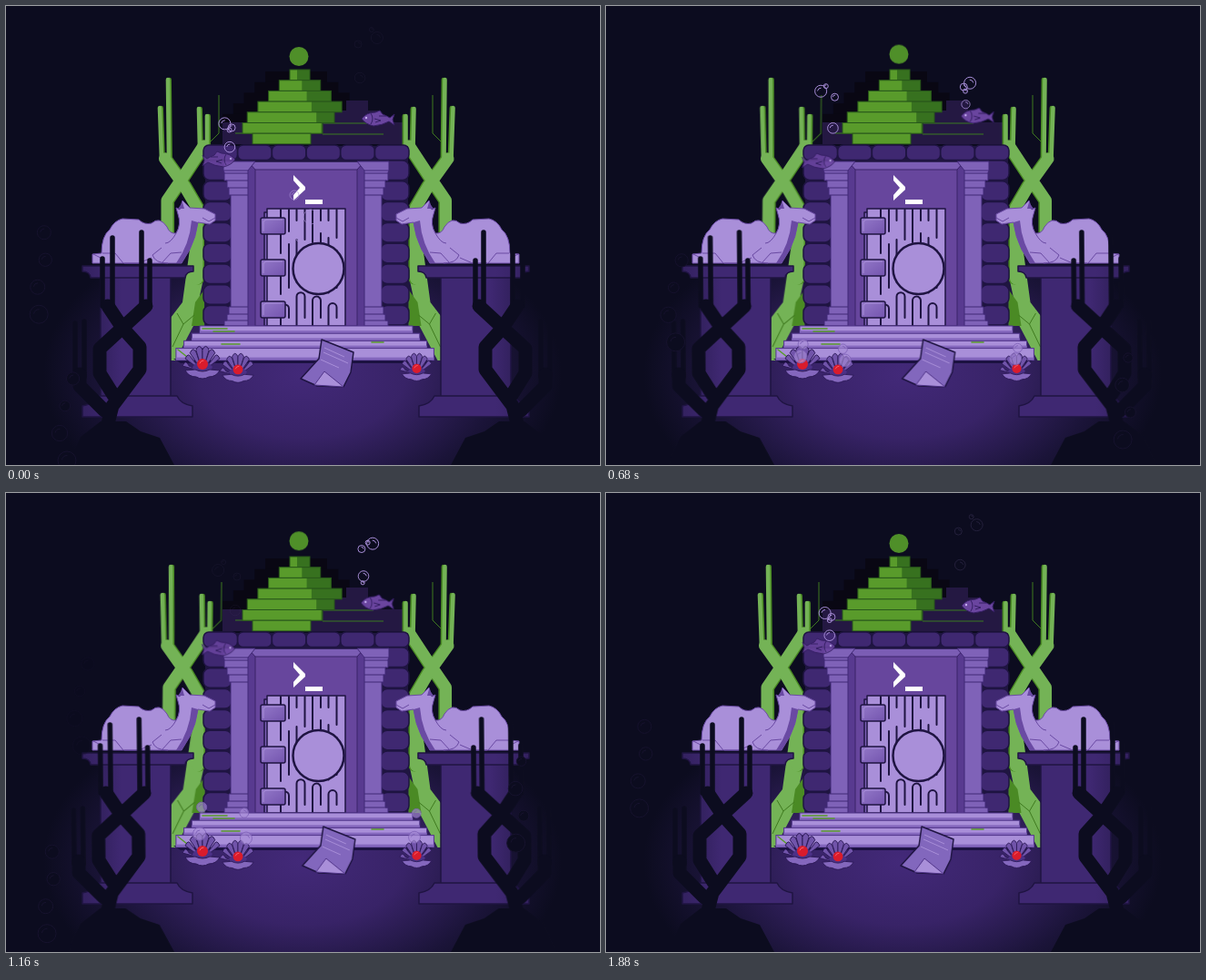
These frames come from a looping animation (653x505 px, 1.92 s). An HTML page:

```html
<!DOCTYPE html>
<html lang="en">
<head>
<meta charset="utf-8">
<title>Sunken temple</title>
<style>
html, body { margin: 0; width: 100%; height: 100%; overflow: hidden; background: #0c0c1f; }
svg { display: block; width: 653px; height: 505px; }
.lean, .bob { animation: 960ms cubic-bezier(.37, 0, .63, 1) infinite alternate; }
.lean { animation-name: lean; }
.bob { animation-name: bob; }
@keyframes lean { to { transform: skewX(var(--a)); } }
@keyframes bob { to { transform: translate(var(--x, 0px), var(--y, 0px)); } }
.ink { stroke: #1f1442; stroke-width: 1.5; stroke-linejoin: round; }
.thin { fill: none; stroke-width: 1; }
.line { fill: none; stroke-linecap: round; stroke-linejoin: round; }
</style>
</head>
<body>
<svg id="stage" viewBox="0 0 653 505">
<defs>
  <radialGradient id="glow" gradientUnits="userSpaceOnUse" cx="0" cy="0" r="1" gradientTransform="translate(326 405) scale(285 175)">
    <stop offset="0" stop-color="#432979"/><stop offset=".4" stop-color="#382367"/>
    <stop offset=".75" stop-color="#1b1439"/><stop offset="1" stop-color="#0c0c1f"/>
  </radialGradient>
  <linearGradient id="plinth"><stop offset="0" stop-color="#33215f"/><stop offset=".3" stop-color="#3f2872"/></linearGradient>
  <linearGradient id="hinge" x2="1" y2="1"><stop offset="0" stop-color="#9479c9"/><stop offset="1" stop-color="#7354ae"/></linearGradient>

  <g id="stems" class="line">
    <path stroke-width="4.6" d="M169 112L171 168M178 81L179 166M212 113L213 156M221 121V152"/>
    <path stroke-width="13" d="M174.5 168L196 198L210 222V300M217 154L196 186L177 214V262"/>
  </g>
  <g id="weed">
    <path fill="#74b356" d="M203 260H217V300L206 352L186 390H180L181 343L194 326Z"/>
    <path fill="#4a8a24" d="M208 326L218 312V352H204Z"/>
    <use href="#stems" x="1.6" stroke="#4a8a24"/>
    <use href="#stems" stroke="#74b356"/>
    <path class="thin" stroke="#3f7a1f" d="M183 375L195 350L188 338M195 350L207 340"/>
  </g>

  <g id="pillar">
    <g fill="#3f2871" class="ink" id="blocks"></g>
    <path fill="#7f62b8" stroke="#412876" d="M239 171H274L266 181V352H240V346H243V339H245V331H247V208H245V200H243V192H240V183L239 181Z"/>
    <path class="thin" stroke="#412876" d="M239 181H266M240 184H266M242 192H266M244 200H266M247 208H266M247 331H266M243 339H266M240 346H266"/>
  </g>

  <g id="statue">
    <g fill="url(#plinth)" class="ink">
      <path d="M104 297H181V430H104Z"/>
      <path d="M84 286H206V292Q198 292 197 299H93Q92 292 84 292Z"/>
      <path d="M99 429H188Q192 438 205 440V452H84V440Q97 438 99 429Z"/>
    </g>
    <path fill="#a98fd9" stroke="#6a4aa3" d="M95 283V273L105 272Q105 253 114 246Q119 236 128 234L146 235Q152 241 160 239Q169 231 177 243Q180 251 187 250Q193 240 189 229L187 222L191 224L194 214L202 222L218 223L230 229V236L224 240L211 238Q209 254 202 268L193 283Z"/>
    <path fill="#6a4aa3" d="M211 238Q209 254 202 268L193 283H187Q202 262 204 236ZM189 223L194 216L196 223Z"/>
    <path class="thin" stroke="#6a4aa3" d="M96 273L104 277V283M106 272H120L129 283M178 283Q164 283 161 274L171 266M130 283H146L160 277M171 283L181 272L193 271M187 250Q181 261 175 261M216 233L223 237L230 233"/>
  </g>

  <g id="shade" stroke="#0c0c1f">
    <g class="line">
      <path stroke-width="5.5" d="M106 278V330M117 255V332M149 249V332M158 280V330M76 349V408M86 347V408"/>
      <path stroke-width="15" d="M112 330L128 354L147 375V400L117 440L108 475M154 330L128 354L103 377V404L118 428M81 405V418L108 445"/>
    </g>
    <path fill="#0c0c1f" stroke="none" d="M68 505L82 474L104 457H132L148 468L169 475L185 505Z"/>
  </g>

  <g id="fish">
    <path fill="#6a459f" stroke="#351f63" d="M391 124Q396 117 406 117L411 115L414 119Q419 121 422 123L427 119L425 125L427 131L421 127Q414 131 404 132Q395 130 391 124Z"/>
    <path class="thin" stroke="#351f63" d="M401 118Q405 124 401 130M405 124L412 126L406 128M410 121H418"/>
    <circle cx="396" cy="123" r="1.2" fill="#c4aef0"/>
  </g>

  <g id="clam">
    <g id="fan" fill="#7154aa" stroke="#2d1a58"></g>
    <path fill="#4c3187" d="M-11 4Q0 -10 11 4L8 10H-8Z"/>
    <path fill="#8467bd" stroke="#2d1a58" d="M-19 8L-8 7Q0 11 8 7L19 8Q15 15 7 15Q0 19 -7 15Q-15 15 -19 8Z"/>
    <circle cy="1" r="6" fill="#d91c2c"/><path class="line" stroke="#ff6268" d="M-3 0Q-2 -3 1 -3"/>
  </g>
</defs>

<rect width="653" height="505" fill="#0c0c1f"/>
<rect y="220" width="653" height="285" fill="url(#glow)"/>

<g id="ruin" fill="#090713"></g>
<path fill="#241842" d="M238 128H348V115H374V104H398V115H412V128H437V152H238Z"/>
<path class="thin" stroke="#3b7a20" d="M252 140H275M348 141H415M349 129H404"/>
<g id="dome"></g>
<circle class="bob" style="--y:-3px" cx="322" cy="55.5" r="10.5" fill="#4f8f29"/>

<g class="lean" style="--a:-.65deg;transform-origin:200px 390px">
  <path class="thin" stroke="#3f7a1f" d="M234 98V140L222 152"/>
  <use href="#weed"/>
</g>
<path class="thin" stroke="#3f7a1f" d="M469 98V140L480 151"/>
<use href="#weed" transform="translate(660.5) scale(-1 1)"/>

<rect x="219" y="154" width="223" height="198" fill="#1f1640"/>
<g id="roof" fill="#3f2871" class="ink"></g>
<path fill="#7b5db4" class="ink" d="M266 171H394V352H266Z"/>
<path fill="#583a90" d="M266 171L274 180V352H266ZM394 171L386 180V352H394Z"/>
<path fill="#67469d" stroke="#3b2369" d="M274 180H386V352H274Z"/>
<path class="thin" stroke="#3b2369" d="M266 171L274 180M394 171L386 180"/>
<use href="#pillar"/>
<use href="#pillar" transform="translate(660) scale(-1 1)"/>

<path fill="#7f62b8" class="ink" d="M284 227H292V352H284Z"/>
<path fill="#a98fd9" class="ink" d="M287 223H373V352H287Z"/>
<g id="grain" class="line" stroke="#1f1442" stroke-width="2"></g>
<circle cx="343.5" cy="289" r="28" fill="#a98fd9" stroke="#1f1442" stroke-width="2.5"/>
<g id="hinges" fill="url(#hinge)" class="ink"></g>
<path fill="#fff" d="M316 186L329 199V202L316 214V208L323 200L316 192ZM329 213H348V218H329Z"/>

<path fill="#1b1140" d="M184 388H472L464 393H192Z"/>
<g id="stairs" fill="#a98fd9" stroke="#51358a"></g>
<path class="line" stroke="#599b2b" stroke-width="1.6" d="M216 355H243M228 358H251M237 372H257M402 370H415M189 378L199 386"/>

<use href="#statue"/>
<use href="#statue" transform="translate(659) scale(-1 1)"/>

<g class="bob" style="--x:-.5px;--y:2.5px"><use href="#fish" transform="translate(643 45) scale(-1 1)" opacity=".85"/></g>
<g class="bob" style="--x:-.8px;--y:-3.5px"><use href="#fish"/></g>

<g class="bob" style="--x:2px">
  <path fill="#8267bd" class="ink" d="M347 367L382 381L379 403L371 419L342 418L324 410L344 388Z"/>
  <path fill="#a98fd9" stroke="#51358a" d="M339 417L350 402L371 419Z"/>
  <path class="thin" stroke="#a98fd9" d="M350 376L372 386M349 381L376 393M346 389L366 398"/>
</g>

<use href="#clam" transform="translate(216 393)"/>
<use href="#clam" transform="translate(255 399) scale(.9)"/>
<use href="#clam" transform="translate(451.5 398) scale(.85)"/>
<g id="air"></g>

<g class="lean" style="--a:.7deg;transform-origin:130px 500px"><use href="#shade"/></g>
<g class="lean" style="--a:.6deg;transform-origin:540px 500px"><use href="#shade" transform="translate(674) scale(-1 1)"/></g>
<g id="front"></g>
</svg>

<script>
const LOOP = 1920, STEP = 40, TIER = 11.7;
const { min, max, sin, cos, PI } = Math;

function add(parent, tag, attrs) {
  const el = document.createElementNS("http://www.w3.org/2000/svg", tag);
  for (const k in attrs) el.setAttribute(k, attrs[k]);
  return (parent.append ? parent : document.getElementById(parent)).appendChild(el);
}
const box = (parent, x, y, width, height, more) => add(parent, "rect", { x, y, width, height, ...more });
const times = (n, fn) => { for (let i = 0; i < n; i++) fn(i); };

// Architecture
times(5, i => {
  const x = 285 - TIER * i, y = 72 + TIER * i;
  box("ruin", x, y, 68 + 24 * i, 152 - y);
});
times(7, i => {
  const y = 70 + TIER * i;
  const left = max(312 - TIER * i, 205 + 11 * i);
  const right = min(334 + TIER * i, 413 - 13 * i);
  const split = min(320 + 5.3 * i, right);
  box("dome", left, y, right - left, TIER, { fill: "#37711f" });
  box("dome", left, y, split - left, TIER, { fill: "#599b2b" });
  box("dome", left, y, right - left, TIER, { fill: "none", stroke: "#28581b" });
});
times(6, i => box("roof", 217 + i * 37.7, 153, 37.5, 16.5, { rx: 6 }));
times(8, i => box("blocks", 217, 170 + i * 22.8, 31, 21.5, { rx: 7 }));
times(3, i => {
  const y = 233 + 46 * i;
  box("hinges", 280, y, 27, 18, { rx: 2 });
  add("hinges", "path", { d: `M283 ${y + 15}V${y + 4}L286 ${y + 2}H304`, class: "thin", stroke: "#a98fd9" });
});
times(4, i => {
  const x = 213 - 8.7 * i, y = 352 + 8.2 * i, w = 234 + 16.5 * i, h = i < 3 ? 8.2 : 13;
  box("stairs", x, y, w, h);
  box("stairs", x, y + h - 3, w, 3, { fill: "#8467bd", stroke: "none" });
});

// Door grain: loops hanging from the top, arches rising from the sill, dashes between
times(4, i => {
  const x = 302 + 17.5 * i, drop = 248 + 12 * sin(i * 2.3), rise = 325 + 8 * cos(i * 2.3);
  add("grain", "path", { d: `M${x} 224V236M${x + 9} 224V${drop}M${x + 9} ${drop + 14}V310M${x} ${drop}V${drop + 24}` });
  add("grain", "path", { d: `M${x} 351V${rise}a4.5 4.5 0 0 1 9 0V343M${x} 296V${rise - 16}` });
});

// Shell fan: overlapping scallops around the hinge
times(7, i => {
  const a = PI * (1.08 + .12 * i), x = 19 * cos(a), y = 8 + 24 * sin(a);
  add("fan", "path", { d: `M0 9L${x - 3.6} ${y + 1}Q${x} ${y - 7} ${x + 3.6} ${y + 1}Z` });
});

// A bubble lives from start to end (times after shift), moving from (x, y) by (dx, dy)
const bubbles = [];
const linear = p => p, slowing = p => sin(p * PI / 2);

function bubble(parent, { x, y, dx, dy, r, start = 0, end, fade, grow = 200, shift = 0, ease = linear, alpha = 1, place = "", ...look }) {
  const g = add(parent, "g", { transform: place });
  const ball = add(g, "g", {});
  add(ball, "circle", { r: 1, fill: "none", stroke: "#a98fd9", "stroke-width": 1 / r, ...look });
  add(ball, "path", { class: "line", stroke: look.stroke || "#a98fd9", "stroke-width": 1 / r, d: "M-.55 -.1Q-.45 -.55 0 -.55" });
  bubbles.push(t => {
    const s = (t - shift + LOOP) % LOOP, p = (s - start) / (end - start);
    const on = p >= 0 && p < 1;
    ball.style.display = on ? "" : "none";
    if (!on) return;
    const size = r * (grow ? min(1, .3 + (s - start) / grow) : 1);
    ball.setAttribute("opacity", alpha * min(1, (end - s) / (end - fade)));
    ball.setAttribute("transform", `translate(${x + dx * p} ${y + dy * ease(p)}) scale(${size})`);
  });
}

// Fish breath, the second one mirrored
const breath = [
  { x: 243, y: 159, dx: -10, dy: -74, r: 6.5 },
  { x: 246, y: 162, dx: 8, dy: -70, r: 4 },
  { x: 245, y: 162, dx: 7, dy: -33, r: 5.8, start: 240 },
  { x: 247, y: 160, dx: -8, dy: -84, r: 2.5, start: 160 },
  { x: 246, y: 161, dx: 6, dy: -18, r: 2, start: 660, end: 1000, fade: 850 }
];
for (const b of breath) {
  const puff = { end: 1600, fade: 1220, ease: slowing, ...b };
  bubble("air", { ...puff, shift: 1500 });
  bubble("air", { ...puff, shift: 340, place: "translate(641 -50) scale(-1 1)" });
}

// Two bubbles from each shell: a fast one and a slow one
for (const place of ["translate(216 393)", "translate(261 397) scale(-.9 .95)", "translate(452 395) scale(.9)"]) {
  const puff = { start: 250, end: 1840, fade: 1400, alpha: .9, fill: "#a98fd9", "fill-opacity": .7, stroke: "#7f62b8", place };
  bubble("air", { ...puff, x: 2, y: 3, dx: -5, dy: -88, r: 5.5 });
  bubble("air", { ...puff, x: -1, y: 2, dx: -4, dy: -35, r: 7.2 });
}

// Last air in front of the door
times(3, i => bubble("air", {
  x: [317, 335, 322][i], y: 208 + 24 * i, dx: 3, dy: -38, r: [5, 8, 3][i], grow: 0, end: 420, fade: 0, alpha: .65
}));

// Dark streams close to the viewer, scattered by a seeded random
let seed = 7;
const random = () => (seed = seed * 16807 % 2147483647) / 2147483647;
for (const [shift, x, dx] of [[0, 67, 18], [1080, 46, -15], [560, 570, -20]])
  times(4, i => bubble("front", {
    shift, x: x + (i ? 20 * random() - 8 : 0), y: 500 - 30 * i, dx, dy: -245, r: i ? 5 + 4 * random() : 10,
    end: 1280, fade: 900, grow: 0, fill: "#0c0c1f", stroke: "#17132e"
  }));

function draw(now) {
  const t = Math.floor(now % LOOP / STEP) * STEP;
  for (const pose of bubbles) pose(t);
  requestAnimationFrame(draw);
}
requestAnimationFrame(draw);
</script>
</body>
</html>
```
